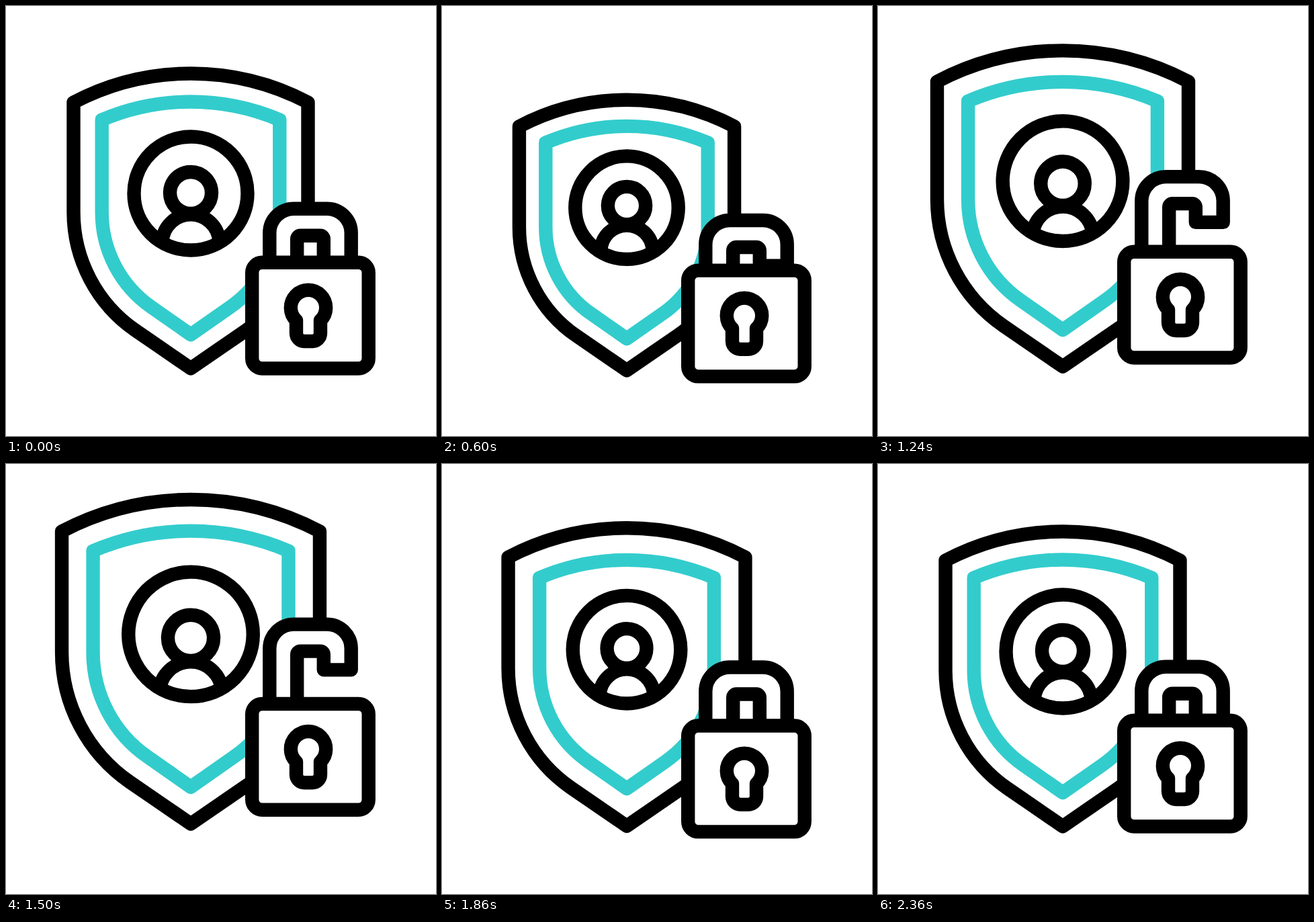
An HTML page that plays this animation: 640x640 px, repeating every 2560 ms.

```html
<!DOCTYPE html>
<html lang="en">
<head>
<meta charset="utf-8">
<title>Shield and lock</title>
<style>
  html, body { margin: 0; width: 100%; height: 100%; overflow: hidden; background: #fff; }
  svg { display: block; width: 100%; height: 100%; }
  .line { fill: none; stroke: #000; stroke-width: 20.4; stroke-linejoin: round; }
  .teal { stroke: #3cc; }
  .solid { fill: #fff; }
</style>
</head>
<body>
<svg viewBox="0 0 640 640">
  <g id="badge">
    <path id="outer" class="line" d="M100.5 143.5A375.6 375.6 0 0 1 449.5 143.5V307A214 214 0 0 1 357 483L275 539.3L193 483A214 214 0 0 1 100.5 307Z"/>
    <path id="inner" class="line teal" d="M142.7 169.5A337.6 337.6 0 0 1 407.3 169.5V307A172 172 0 0 1 333 448.6L275 489.2L217 448.6A172 172 0 0 1 142.7 307Z"/>
    <circle id="ring" class="line" cx="275" cy="279" r="84.5"/>
    <g id="person" class="line">
      <circle cx="275" cy="278" r="31"/>
      <path d="M232.6 350A42.5 42.5 0 0 1 317.4 350"/>
    </g>
  </g>
  <g id="lock">
    <path id="cover" fill="#fff"/>
    <path id="shackle" class="line"/>
    <rect class="line solid" x="366.2" y="381.7" width="173.5" height="157.8" rx="15"/>
    <path class="line" d="M432 468A26.2 26.2 0 1 1 468 468V487a12 12 0 0 1 -12 12H444a12 12 0 0 1 -12 -12Z"/>
  </g>
</svg>
<script>
const LOOP = 2560, STEP = 20, STROKE = 20.4;
const TIMES = [200, 400, 1500, 1700, 1940, 2260];

// Value at each of TIMES
const TRACKS = {
  pulse:   [0, -1, 1, -1, 0.5, 0],
  person:  [0, -2.6, 6.6, -2.6, 3.3, 0],
  lock:    [0, 12.8, -25.6, 12.8, -19, 0],
  shackle: [0, 9.6, -38.4, 9.6, -12.8, 0],
  leg:     [94, 67.8, 67.8, 94, 94, 94]
};
const LAG = { inner: 33, ring: 67, lock: 100 };

const el = id => document.getElementById(id);
const ease = u => u * u * (3 - 2 * u);

function track(name, time) {
  const values = TRACKS[name];
  if (time <= TIMES[0]) return values[0];
  const next = TIMES.findIndex(t => time < t);
  if (next < 0) return values[values.length - 1];
  const u = (time - TIMES[next - 1]) / (TIMES[next] - TIMES[next - 1]);
  return values[next - 1] + (values[next] - values[next - 1]) * ease(u);
}

// Scale about a point on the axis while keeping the line weight
function scale(id, cy, time, dy = 0) {
  const s = 1 + 0.1 * track("pulse", time);
  const node = el(id);
  node.setAttribute("transform", `translate(275 ${cy + dy}) scale(${s}) translate(-275 ${-cy})`);
  node.style.strokeWidth = STROKE / s;
}

function drawShackle(top, leg) {
  const foot = 396;
  const arch = `M392.3 ${foot}V${top + 36}a36 36 0 0 1 36 -36H477.7a36 36 0 0 1 36 36`;
  el("cover").setAttribute("d", `${arch}V${foot}Z`);
  el("shackle").setAttribute("d",
    `${arch}V${top + leg}H472.8V${top + 45}a5 5 0 0 0 -5 -5H438.2a5 5 0 0 0 -5 5V${foot}`);
}

function draw(t) {
  el("badge").setAttribute("transform", `translate(0 ${-25.6 * track("pulse", t)})`);
  scale("outer", 319.8, t);
  scale("inner", 316.1, t - LAG.inner);
  scale("ring", 279, t - LAG.ring);
  scale("person", 279, t - LAG.ring, track("person", t - LAG.ring));
  el("lock").setAttribute("transform", `translate(0 ${track("lock", t - LAG.lock)})`);
  drawShackle(301.7 + track("shackle", t), track("leg", t));
}

const start = performance.now();
function tick() {
  const t = (performance.now() - start) % LOOP;
  draw(Math.floor(t / STEP) * STEP);
  requestAnimationFrame(tick);
}
tick();
</script>
</body>
</html>
```
